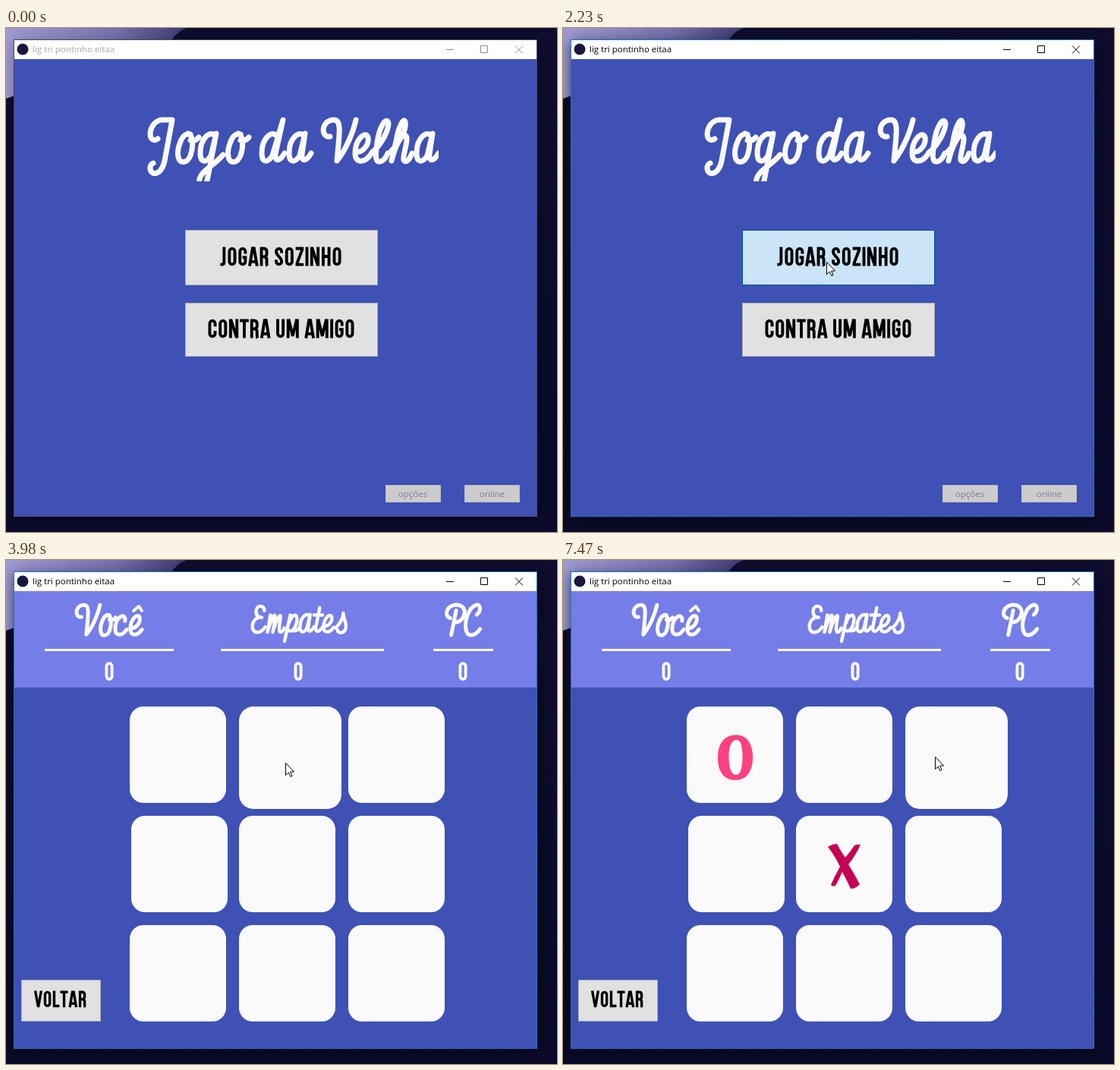
These frames come from a looping animation (726x664 px, 8000 ms). An HTML page:

```html
<!DOCTYPE html>
<html lang="pt">
<head>
<meta charset="utf-8">
<title>Jogo da Velha</title>
<style>
  html, body { margin: 0; width: 100%; height: 100%; overflow: hidden; background: #0d0b2b; }
  svg { display: block; }
  text { font: 11.5px "Open Sans", "Noto Sans", sans-serif; }
  .caps { fill: none; stroke: #000; stroke-width: 10.8; }
  .script { fill: none; stroke: #fafafa; stroke-width: 7; stroke-linecap: round; stroke-linejoin: round; }
  .button { fill: #e1e1e1; stroke: #adadad; }
  .disabled rect { fill: #ccc; stroke: #bfbfbf; }
  .disabled text { fill: #7f7d98; text-anchor: middle; }
</style>
</head>
<body>
<svg width="726" height="664" viewBox="0 0 726 664">
  <defs>
    <linearGradient id="sky" x1="0" x2="1" y1="0" y2="0">
      <stop offset="0" stop-color="#a09bd2"/>
      <stop offset=".6" stop-color="#7772ae"/>
      <stop offset="1" stop-color="#3d3970"/>
    </linearGradient>
    <linearGradient id="night" x1="0" x2="0" y1="0" y2="1">
      <stop offset="0" stop-color="#0e0d2e"/>
      <stop offset="1" stop-color="#0a0a2a"/>
    </linearGradient>
    <filter id="blur"><feGaussianBlur stdDeviation="9"/></filter>
    <clipPath id="titleBox"><rect x="180" y="110" width="390" height="92"/></clipPath>
  </defs>

  <rect width="726" height="664" fill="url(#night)"/>
  <path d="M0 0H238Q226 4 218 16H11V89Q6 91 0 93Z" fill="url(#sky)"/>
  <rect id="shadow" x="10" y="19" width="690" height="628" filter="url(#blur)"/>

  <rect x="11" y="41" width="688" height="602" fill="#3f51b5"/>
  <rect x="11" y="16" width="688" height="25" fill="#fff"/>
  <rect id="frame" x="10.5" y="15.5" width="689" height="628" fill="none"/>
  <circle cx="22" cy="28" r="7.5" fill="#17173f"/>
  <text id="caption" x="35" y="32">lig tri pontinho eitaa</text>
  <path id="controls" d="M580 28.5h10M625.5 23.5h9v9h-9ZM671 23.5l10 10m0-10l-10 10" fill="none"/>

  <g id="menu">
    <g id="title" clip-path="url(#titleBox)"></g>
    <rect id="solo" class="button" x="236.5" y="266.5" width="253" height="72"/>
    <rect id="friend" class="button" x="236.5" y="362.5" width="253" height="70"/>
    <g id="menuText"></g>
    <g class="disabled">
      <rect x="500.5" y="602.5" width="72" height="22"/><text x="536" y="618">opções</text>
      <rect x="604.5" y="602.5" width="72" height="22"/><text x="640.5" y="618">online</text>
    </g>
  </g>

  <g id="game">
    <rect x="11" y="41" width="688" height="127" fill="#757de8"/>
    <path d="M51 118.5H221M283 118.5H498M563 118.5H642" stroke="#fafafa" stroke-width="3"/>
    <g id="score"></g>
    <rect class="button" x="20.5" y="553.5" width="104" height="54"/>
    <g id="back"></g>
    <g id="cells" fill="#fafafa"></g>
    <g id="marks">
      <path fill="#ff4081" fill-rule="evenodd" d="M227 230.500C242 230 250 242 250 260S242 290 227 290S204 279 204 260S213 231 227 230.500ZM228 237C221 238 218 248 218.500 262S222 283 228 283S237 272 236.500 257S233 236 228 237Z"/>
      <path fill="#c60055" d="M349 378Q355 374 361 374Q366 384 372 392Q380 382 384 376Q388 374 392 375Q386 389 376 401Q384 414 391 427Q386 433 379 433Q374 422 368 411Q363 422 359 429Q355 431 353 428Q358 416 365 404Q359 391 349 378Z"/>
    </g>
  </g>

  <path id="cursor" d="M.5.5V16.500L4.300 13L6.800 18.500L9 17.500L6.600 12H11.500Z" fill="#fff" stroke="#000"/>
</svg>
<script>
const $ = id => document.getElementById(id);
const LOOP = 8000;

// Condensed capitals: [advance, stroke path] in hundredths of an em.
const top1 = 'a10 11 0 0 1 20 0', top0 = 'a10 11 0 0 0-20 0';
const low1 = 'a10 11 0 0 1-20 0', low0 = 'a10 11 0 0 0 20 0';
const round = `M9.5 17${top1}V53${low1}Z`;
const CAPS = {
  ' ': [16, ''],
  O: [38.8, round],
  0: [38.8, round],
  C: [38.4, `M29.5 27V17${top0}V53${low0}V43`],
  G: [38.5, `M29.5 25V17${top0}V53${low0}V38H19`],
  S: [37.4, `M28.5 22V17${top0}C8.5 34 28.5 36 28.5 53${low1}V47`],
  U: [38.6, `M9.3 0V53${low0}V0`],
  J: [25, 'M15 0V55Q15 64.500 6 64.500H1'],
  A: [40.5, 'M6.5 70L17.500 5H23L34 70M10 54H30'],
  R: [39.4, 'M9.5 70V5.5H18Q29 5.5 29 17V25Q29 36 18 36H10M18 36Q29 36 29 47V60Q29 67 31 70'],
  Z: [36.9, 'M4 5.5H28V10L9 60V64.500H33.500'],
  I: [17, 'M8.5 0V70'],
  N: [41.8, 'M9 70V0M32.500 70V0M10 2L31.500 68'],
  H: [40.8, 'M9.7 0V70M31 0V70M10 35H31'],
  T: [35.6, 'M1.5 5.5H34M17.800 0V70'],
  M: [52.2, 'M9 70V0M43 70V0M11 0L26 62L41 0'],
  V: [38.7, 'M6.5 0L18.500 65H20.500L32 0'],
  L: [33.8, 'M9.5 0V64.500H32']
};

function caps(text, x, y, size, color = '#000') {
  let pen = 0;
  const letters = [...text].map(ch => {
    const [advance, d] = CAPS[ch];
    const out = `<path d="${d}" transform="translate(${pen})"/>`;
    pen += advance;
    return out;
  });
  return `<g class="caps" role="img" aria-label="${text}" style="stroke:${color}" ` +
    `transform="translate(${x} ${y}) scale(${size / 100})">${letters.join('')}</g>`;
}

// Brush lettering: stroke paths on a baseline at y = 0.
const bowl = 'M24-36C18-46 4-34 4-14C4-1 12-1 18-11';
const belly = 'C4 0 17-1 25-13';
const SCRIPT = {
  J: 'M14-33C-1-24 1-57 20-58Q27-58 33-58L23-4C19 16 3 17 4 4Q5 0 8-1',
  V: 'M13-36C0-34 1-58 18-58C29-58 25-38 22-4C35-20 44-44 47-58',
  P: 'M21-48L12-3M10-34C-3-38 4-60 24-58C44-56 38-26 18-26',
  C: 'M24-40C33-48 31-60 23-58C9-54 0-26 5-10C9 2 22-2 30-14',
  E: 'M29-48C30-62 10-60 12-44C13-34 20-34 24-34C10-36 2-22 5-10C9 2 24-2 31-14',
  o: 'M20-39C8-43 2-18 4-9C6 1 16-1 20-11C24-22 24-37 17-40M20-31Q26-29 31-35',
  a: `${bowl}L25-40L21-13C20-3 26-2 33-14`,
  d: `${bowl}L32-58L22-13C21-3 27-2 34-14`,
  g: `${bowl}L25-40L13 22C9 32 1 30 3 20C6 8 23 2 34-12`,
  e: `M5-16C14-14 23-26 21-35C18-44 4-33 4-14${belly}`,
  c: `M22-29C24-45 4-38 4-14${belly}`,
  l: 'M2-15C14-24 24-44 24-53C22-64 12-50 9-28C6-8 7-2 13-3Q19-4 23-14',
  h: 'M2-15C16-30 24-46 22-55C20-63 13-48 10-30L4-4C9-24 18-42 23-37C27-32 18-10 20-5C23 0 28-6 31-14',
  m: 'M10-39L4-3C14-38 21-45 20-33L15-3C25-38 34-45 31-31C28-12 27-3 32-3Q36-4 39-12',
  p: 'M12-39L0 16M9-22C18-47 30-41 25-22C21-6 12-2 8-8M20-6Q27-5 32-14',
  t: 'M18-54L10-14C8-2 16-1 24-14M6-39H24',
  s: 'M2-12C14-24 18-36 18-43C18-30 28-20 22-8C18 0 6 0 6-8'
};

function script(label, xs, y, scale) {
  const letters = [...label.replace(/ /g, '').normalize('NFD').replace(/\u0302/g, '')];
  return `<g class="script" role="img" aria-label="${label}">` + letters.map((ch, i) =>
    `<path d="${SCRIPT[ch]}" transform="translate(${xs[i]} ${y}) scale(${scale})"/>`).join('') + '</g>';
}

$('title').innerHTML = script('Jogo da Velha',
  [186, 223, 252, 289, 333, 369, 414, 456, 480, 504, 537], 179, 1);
$('menuText').innerHTML = caps('JOGAR SOZINHO', 282, 288.5, 35.8) + caps('CONTRA UM AMIGO', 265, 383.5, 35.8);
$('back').innerHTML = caps('VOLTAR', 36.5, 567.5, 31);
$('score').innerHTML =
  script('Você', [90, 122, 141, 161], 101, .72) +
  '<path class="script" style="stroke-width:4" d="M168 67L175 61L179 67"/>' +
  script('Empates', [322, 342, 367, 385, 402, 416, 433], 97, .63) +
  script('PC', [578, 603], 101, .72) +
  [136, 385, 602].map(x => caps('0', x - 7, 134, 36, '#fafafa')).join('');

const cells = Array.from({ length: 9 }, (_, i) => {
  const el = document.createElementNS('http://www.w3.org/2000/svg', 'rect');
  const cell = { el, x: 163 + i % 3 * 144 + (i === 3 ? 2 : 0), y: 193 + Math.floor(i / 3) * 144 };
  el.setAttribute('x', cell.x);
  el.setAttribute('y', cell.y);
  $('cells').append(el);
  return cell;
});

// Pointer stops held until the next one: each leg is [start, end, "x,y x,y ..."].
const legs = [
  [230, 980, '652,645 560,535 470,440 425,345 402,306 395,308 392,330'],
  [1110, 1600, '387,386 380,398 367,352 352,318 347,308'],
  [2480, 2980, '347,304 345,297 342,289 337,281 325,270'],
  [3100, 3860, '270,250 215,220 165,190 140,183 168,200 215,230 280,255'],
  [3980, 3980, '368,267'],
  [4350, 4610, '372,235 374,195 376,163'],
  [4840, 5220, '380,200 384,270 390,350 396,422'],
  [5970, 6470, '400,400 425,352 457,310 486,280 507,260'],
  [7350, 7470, '498,260 490,259']
];
const stops = legs.flatMap(([start, end, points]) => points.split(' ').map((p, i, all) => {
  const [x, y] = p.split(',').map(Number);
  return { t: start + (end - start) * i / Math.max(1, all.length - 1), x, y };
}));

// Button glow, stepped with the pointer.
const soloGlow = [[0, 0], [600, .3], [725, .7], [850, 1], [1110, .8], [1230, .3], [1350, .2], [1475, .7], [1600, 1]];
const friendGlow = [[0, 0], [480, .3], [600, .1], [725, 0], [1110, .2], [1230, .7], [1350, .8], [1475, .3], [1600, 0]];
const held = (steps, t) => steps.filter(s => s[0] <= t).pop()[1];
const mix = (a, b, k) => `rgb(${a.map((v, i) => Math.round(v + (b[i] - v) * k))})`;

function paintButton(id, glow) {
  $(id).style.fill = mix([225, 225, 225], [229, 241, 251], glow);
  $(id).style.stroke = mix([173, 173, 173], [0, 120, 215], glow);
}

function draw(t) {
  const active = t >= 2230, playing = t >= 2350;
  const pointer = stops.filter(s => s.t <= t + 1).pop();

  $('menu').style.display = playing ? 'none' : '';
  $('game').style.display = playing ? '' : 'none';
  $('marks').style.display = t >= 5600 ? '' : 'none';
  $('shadow').style.opacity = active ? .6 : .3;
  $('frame').style.stroke = active ? '#1877c9' : '#4b4b5c';
  $('caption').style.fill = active ? '#000' : '#aaa6b2';
  $('controls').style.stroke = active ? '#000' : '#8c8c8c';

  paintButton('solo', held(soloGlow, t));
  paintButton('friend', held(friendGlow, t));
  if (active) {
    $('solo').style.fill = '#cce4f7';
    $('solo').style.stroke = '#005499';
  }

  for (const { el, x, y } of cells) {
    const over = pointer && pointer.x >= x && pointer.x < x + 127 && pointer.y >= y && pointer.y < y + 127;
    const size = !over ? 127 : t < 3100 ? 133 : 135;
    el.setAttribute('width', size);
    el.setAttribute('height', size);
    el.setAttribute('rx', size * .142);
  }

  $('cursor').style.display = pointer ? '' : 'none';
  if (pointer) $('cursor').setAttribute('transform', `translate(${pointer.x} ${pointer.y})`);
}

const begin = performance.now();
function tick() {
  draw((performance.now() - begin) % LOOP);
  requestAnimationFrame(tick);
}
tick();
</script>
</body>
</html>
```
